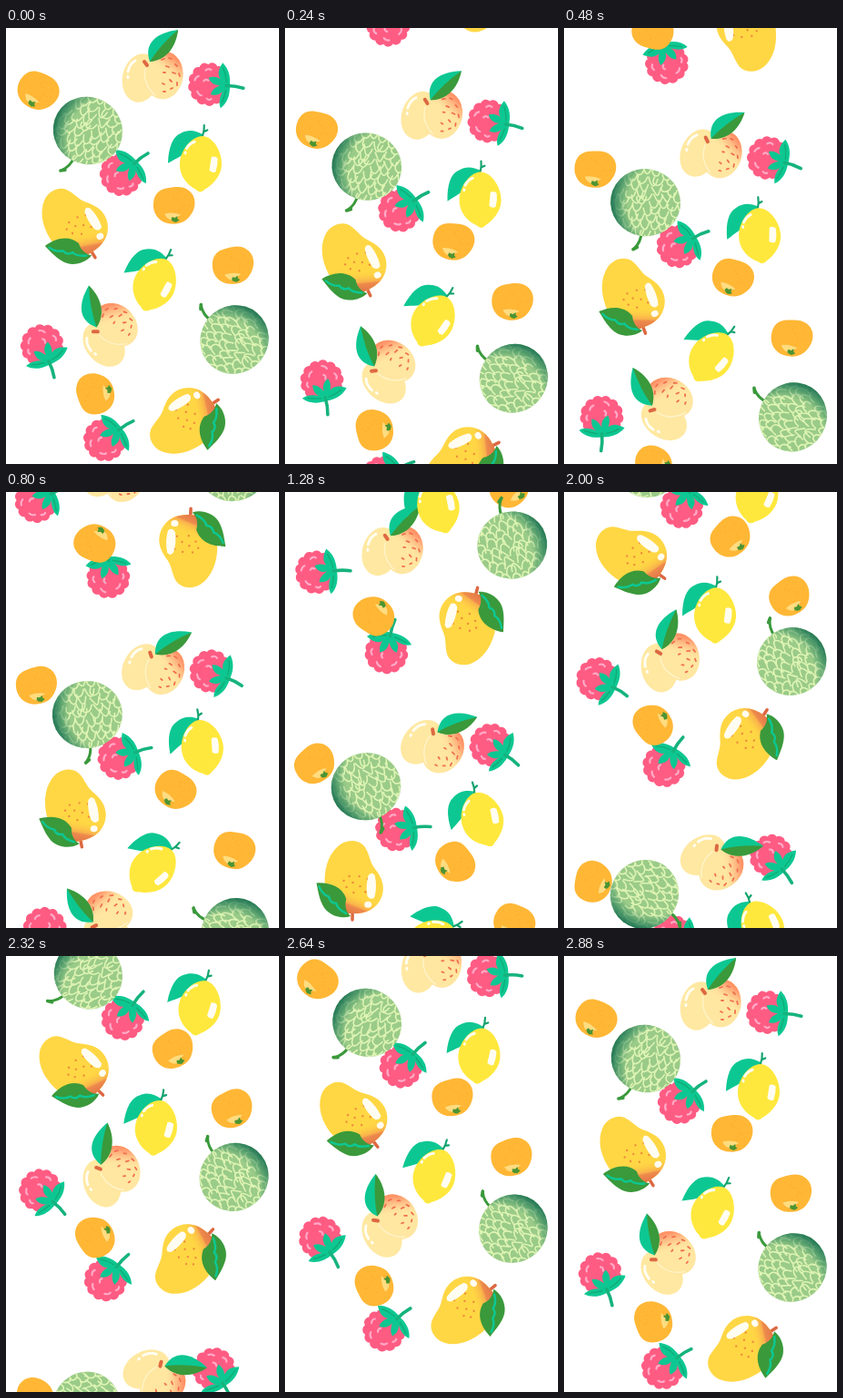
Animation of 300x480 px, one loop 2.96 s. Source, as an HTML page with a canvas:

```html
<!DOCTYPE html>
<html lang="en">
<head>
<meta charset="utf-8">
<title>Falling fruit</title>
<style>
html, body { margin: 0; width: 100%; height: 100%; overflow: hidden; background: #fff; }
canvas { display: block; width: 300px; height: 480px; }
</style>
</head>
<body>
<canvas id="stage" width="300" height="480"></canvas>
<script>
const ctx = document.getElementById('stage').getContext('2d');
const STEP = 80, STEPS = 36, LOOP = 2960;
const TEAL = '#0dc792', GREEN = '#3a993b', RUST = '#dd6842', WHITE = '#fffdf2';
const RAD = Math.PI / 180;

const fill = (d, color) => {
  ctx.fillStyle = color;
  ctx.fill(new Path2D(d));
};
const line = (d, color, width) => {
  ctx.strokeStyle = color;
  ctx.lineWidth = width;
  ctx.stroke(new Path2D(d));
};
const oval = (x, y, rx, ry, color, turn = 0) => {
  ctx.fillStyle = color;
  ctx.beginPath();
  ctx.ellipse(x, y, rx, ry, turn * RAD, 0, 7);
  ctx.fill();
};
const clipped = (path, draw) => {
  ctx.save();
  ctx.clip(path);
  draw();
  ctx.restore();
};
const shade = (gradient, stops) => {
  stops.forEach(([at, color]) => gradient.addColorStop(at, color));
  ctx.fillStyle = gradient;
  ctx.fillRect(-50, -50, 100, 100);
};
const seeded = seed => () => (seed = seed * 16807 % 2147483647) / 2147483647;

function raspberry() {
  const pink = '#ff5c83';
  oval(-1, 0, 19, 20, pink);
  for (let i = 0; i < 13; i++) {
    const a = i * Math.PI * 2 / 13;
    oval(-1 + 17 * Math.cos(a), 18 * Math.sin(a), 6, 6, pink);
  }
  line('M-17-3q1-4 4-5M-6-15q3-3 6-1M-13 9q2 4 5 4M-7-3q2-3 5-1M-2 16q3 2 5 0', '#ffa9c6', 2.2);
  fill('M22 0C22-10 20-18 12-25C8-18 7-12 11-7C6-9 2-9-2-7C1-1 6 1 11 0C7 3 3 5 2 11C8 12 13 10 15 6C12 13 11 19 14 25C21 19 23 10 22 0Z', TEAL);
  line('M18-4Q17-12 13-19M18 5Q17 12 15 19', '#12a871', 1.2);
  line('M18 0Q28-1 37 1', '#15b37d', 3.6);
}

const melonBody = new Path2D();
melonBody.ellipse(0, 0, 37, 38.5, 0, 0, 7);

function melon() {
  line('M34-1Q44-2 52 4', GREEN, 3);
  line('M50 1L53 5', GREEN, 3.6);
  ctx.fillStyle = '#9acb88';
  ctx.fill(melonBody);
  clipped(melonBody, () => {
    const rnd = seeded(71);
    const jitter = n => (rnd() - 0.5) * n;
    let net = '';
    for (let row = 0; row < 11; row++) {
      for (let col = 0; col < 9; col++) {
        const x = -46 + row * 8.4 + jitter(5);
        const y = -44 + col * 10.5 + (row % 2) * 5 + jitter(5);
        net += `M${x} ${y - 5}Q${x + 9 + jitter(4)} ${y - 4} ${x + 8} ${y + jitter(4)}T${x + jitter(5)} ${y + 5}`;
      }
    }
    line(net, '#dff4b4', 1.6);
    shade(ctx.createRadialGradient(-4, -26, 46, -4, -26, 65), [
      [0, 'rgba(49,137,94,0)'], [0.4, 'rgba(49,137,94,.5)'], [0.8, 'rgba(36,122,88,.88)'], [1, '#237653']
    ]);
  });
}

function lemon() {
  fill('M-36 2C-37-16-33-28-25-32C-16-38-8-36-1-33C-4-19-18-10-36 2Z', TEAL);
  line('M-1-30Q1-37 0-43M0-36L4-38', '#14a36f', 2.2);
  fill('M-1-31C11-32 23-15 23 0C23 13 13 23 7 27Q2 33-3 28C-13 24-23 14-23 0C-23-15-12-30-1-31Z', '#ffe83d');
  fill('M11-9Q15-11 18-8Q19 0 17 7Q13 9 10 6Z', WHITE);
  line('M-17-16Q-14-22-9-24', WHITE, 3);
  oval(-18, -11, 1.5, 2, WHITE);
}

function orange() {
  fill('M-7-20C3-21 9-22 16-17C25-10 24 2 18 10C12 19 3 21-7 19C-17 17-24 8-23-3C-22-14-16-19-7-20Z', '#ffb735');
  const rnd = seeded(19);
  for (let i = 0; i < 34; i++) {
    const a = rnd() * 6.28, r = 6 + rnd() * 12;
    oval(r * Math.cos(a), r * Math.sin(a), 0.6, 0.6, '#fbae2c');
  }
  fill('M-11 8Q-2 6 7 10Q2 12 0 16Q-9 15-11 8Z', '#ffdc80');
  fill('M-3 12L0 13L3 11L3 14L5 16L1 18L-2 17L-4 15Z', '#4b9433');
}

const peachLobe = new Path2D();
peachLobe.ellipse(12, -1, 21.5, 26.5, 0.1, 0, 7);

function peach() {
  oval(-13, 2, 20, 27, '#ffe8a1', 12);
  line('M-27-5Q-25-14-19-17', WHITE, 3);
  oval(-27, 1, 1.5, 2.2, WHITE);
  ctx.fillStyle = '#ffe6a1';
  ctx.fill(peachLobe);
  clipped(peachLobe, () => {
    shade(ctx.createLinearGradient(30, -24, 8, 4), [
      [0, '#ff8054'], [0.22, '#ff9a6e'], [0.45, 'rgba(255,190,132,.75)'], [0.75, 'rgba(255,230,161,0)']
    ]);
    line('M10-18l3-1M18-20l3 1M25-13l2 2M15-11l3 1M22-4l3 1M29-3l1 3M12-4l2 0M19 4l2 2M27 7l0 3M11 8l2 1M20 14l2-1M12 17l2 0', '#f0704f', 1.8);
  });
  line('M-8-8Q-11 9 3 21', '#fff4c8', 1.4);
  line('M-9-16L-6-12', RUST, 4);
  fill('M-3-16C-10-36 4-48 28-51C25-31 13-18-3-16Z', TEAL);
  fill('M-3-16Q9-35 28-51C26-31 14-17-3-16Z', GREEN);
}

const mangoBody = new Path2D('M2-38C18-39 31-20 32-2C32 16 26 30 15 38C6 44-6 43-12 35C-17 27-17 20-22 13C-28 5-34-3-32-15C-29-30-16-39 2-38Z');

function mango() {
  line('M1-36L1-45', RUST, 3.5);
  ctx.fillStyle = '#ffd744';
  ctx.fill(mangoBody);
  clipped(mangoBody, () => {
    shade(ctx.createLinearGradient(6, -40, -3, -16), [
      [0, '#df7148'], [0.42, '#ee8b4c'], [0.5, '#f9b04c'], [1, 'rgba(255,215,68,0)']
    ]);
    const spots = [-23, -8, -15, 0, -7, -8, -6, 3, 0, -15, 1, -4, 5, 3, 8, -9, 11, -2, -13, -14];
    for (let i = 0; i < spots.length; i += 2) oval(spots[i], spots[i + 1], 1.2, 1.2, '#ee8b3d');
  });
  oval(-16, -28, 4, 3.5, WHITE);
  fill('M-23-20Q-18-24-15-18Q-13-6-16 4Q-20 9-23 4Q-26-8-23-20Z', WHITE);
  fill('M3-41C14-45 29-40 34-29C38-21 39-14 41-5C27-4 13-8 8-22C10-30 8-36 3-41Z', GREEN);
  line('M8-38Q18-33 19-27Q26-27 27-20Q34-18 38-9', TEAL, 2.5);
}

// Each kind: painter and the direction its stem points in the drawing.
const kinds = {
  raspberry: [raspberry, 0], melon: [melon, 0], lemon: [lemon, -90],
  orange: [orange, 90], peach: [peach, -61], mango: [mango, -90]
};

// kind, x, y, fall per loop, drift per step, stem angle, spin per step
const fruits = [
  ['raspberry', 224, 62, 488, 0.16, 5, 1.85],
  ['raspberry', 127, 161, 474, -0.25, -40, 2.1],
  ['raspberry', 40, 350, 471, 0.25, 68, 3.6],
  ['raspberry', 109, 453, 498, -0.13, -35, 2.1],
  ['orange', 35, 70, 517, -0.08, 118, -4.1],
  ['orange', 185, 196, 478, 0.08, 88, 3.7],
  ['orange', 250, 262, 480, 0.1, 82, 2.2],
  ['orange', 99, 402, 480, 0.04, -15, 1.85],
  ['melon', 90, 113, 475, -0.06, 119, -3.25],
  ['melon', 251, 343, 512, 0.07, -139, -1.55],
  ['peach', 161, 53, 510, 0.1, -61, 1.75],
  ['peach', 114, 337, 491, -0.2, -113, -2.75],
  ['lemon', 214, 150, 475, 0.19, -85, -1.25],
  ['lemon', 163, 283, 480, -0.28, -65, 2],
  ['mango', 75, 214, 477, 0.04, 58, 2.05],
  ['mango', 195, 433, 512, -0.2, -33, 2.1]
];

function drawFruit([kind, x, y, fall, drift, angle, spin], n) {
  const cy = y + fall * n / STEPS;
  if (cy < -70 || cy > 550) return;
  const [paint, stem] = kinds[kind];
  ctx.save();
  ctx.translate(x + drift * n, cy);
  ctx.rotate((angle + spin * n - stem) * RAD);
  paint();
  ctx.restore();
}

function render(now) {
  const step = Math.floor(now % LOOP / STEP);
  ctx.fillStyle = '#fff';
  ctx.fillRect(0, 0, 300, 480);
  ctx.lineCap = 'round';
  ctx.lineJoin = 'round';
  for (const fruit of fruits) {
    drawFruit(fruit, step);
    drawFruit(fruit, step - STEPS);
  }
}

let start;
function tick(now) {
  start ??= now;
  render(now - start);
  requestAnimationFrame(tick);
}
render(0);
requestAnimationFrame(tick);
</script>
</body>
</html>
```
